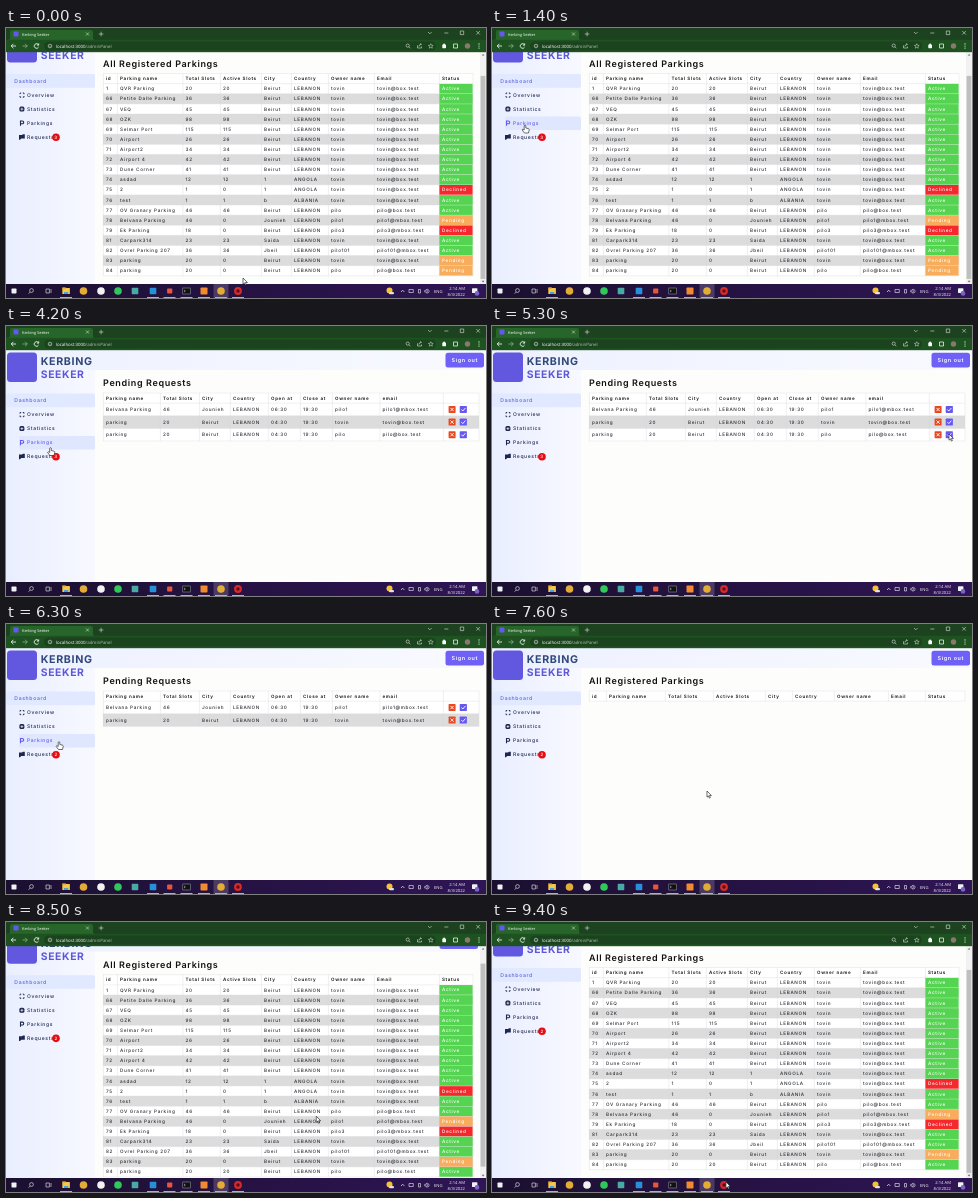
An HTML page that plays this animation: 480x270 px, repeating every 9700 ms.

```html
<!DOCTYPE html>
<html lang="en">
<head>
<meta charset="utf-8">
<title>Admin panel</title>
<style>
html, body { margin: 0; width: 100%; height: 100%; overflow: hidden; background: #fff; }
svg { display: block; width: 100vw; height: 100vh; font-family: Inter, "Open Sans", sans-serif; text-rendering: geometricPrecision; }
#page { letter-spacing: .04em; }
#browser, #taskbar { font-family: "Open Sans", sans-serif; }
</style>
</head>
<body>
<svg id="stage" viewBox="0 0 480 270">
  <defs>
    <linearGradient id="side">
      <stop offset="0" stop-color="#e9eeff"/><stop offset="1" stop-color="#f8f9ff"/>
    </linearGradient>
    <linearGradient id="top">
      <stop offset="0" stop-color="#edf1ff"/><stop offset="1" stop-color="#f9faff"/>
    </linearGradient>
    <linearGradient id="bar">
      <stop offset="0" stop-color="#1b1030"/><stop offset="1" stop-color="#2f1555"/>
    </linearGradient>
  </defs>
  <g id="page"></g>
  <g id="browser"></g>
  <g id="taskbar"></g>
  <g id="pointer"></g>
</svg>
<script>
const LOOP = 9700, STEP = 100, SCROLL = 21.5;
const NAVY = '#1d274f', VIOLET = '#6658ee', INK = '#2b2d33';
const layer = id => document.getElementById(id);

const rect = (x, y, w, h, fill, extra = '') =>
  `<rect x="${x}" y="${y}" width="${w}" height="${h}" fill="${fill}" ${extra}/>`;
const disc = (x, y, r, fill, extra = '') => `<circle cx="${x}" cy="${y}" r="${r}" fill="${fill}" ${extra}/>`;
const line = (d, stroke, width = 0.8) =>
  `<path d="${d}" fill="none" stroke="${stroke}" stroke-width="${width}"/>`;
const text = (x, y, str, size = 4.65, fill = INK, weight = 500, anchor = 'start') =>
  `<text x="${x}" y="${y}" font-size="${size}" fill="${fill}" font-weight="${weight}" text-anchor="${anchor}">${str}</text>`;

// id | name | total | active | city | country | owner | status
const parkings = `1|QVR Parking|20|20|Beirut|LEBANON|tovin|A
66|Petite Dalle Parking|36|36|Beirut|LEBANON|tovin|A
67|VEQ|45|45|Beirut|LEBANON|tovin|A
68|OZK|98|98|Beirut|LEBANON|tovin|A
69|Selmar Port|115|115|Beirut|LEBANON|tovin|A
70|Airport|26|26|Beirut|LEBANON|tovin|A
71|Airport2|34|34|Beirut|LEBANON|tovin|A
72|Airport 4|42|42|Beirut|LEBANON|tovin|A
73|Dune Corner|41|41|Beirut|LEBANON|tovin|A
74|asdad|12|12|1|ANGOLA|tovin|A
75|2|1|0|1|ANGOLA|tovin|D
76|test|1|1|b|ALBANIA|tovin|A
77|OV Granary Parking|46|46|Beirut|LEBANON|pilo|A
78|Belvana Parking|46|0|Jounieh|LEBANON|pilo1|P
79|Ek Parking|18|0|Beirut|LEBANON|pilo3|D
81|Carpark314|23|23|Saida|LEBANON|tovin|A
82|Ovrel Parking 207|36|36|Jbeil|LEBANON|pilo101|A
83|parking|20|0|Beirut|LEBANON|tovin|P
84|parking|20|0|Beirut|LEBANON|pilo|P`.split('\n').map(row => row.split('|'));

const requests = [
  ['Belvana Parking', 46, 'Jounieh', 'LEBANON', '06:30', '19:30', 'pilo1'],
  ['parking', 20, 'Beirut', 'LEBANON', '04:30', '19:30', 'tovin'],
  ['parking', 20, 'Beirut', 'LEBANON', '04:30', '19:30', 'pilo'],
];
const mail = owner => owner + (/\d/.test(owner) ? '@mbox.test' : '@box.test');
const statuses = { A: ['Active', '#55d451'], D: ['Declined', '#f5282e'], P: ['Pending', '#f8ad5d'] };

const parkingHeads = ['id', 'Parking name', 'Total Slots', 'Active Slots', 'City', 'Country', 'Owner name', 'Email', 'Status'];
const requestHeads = ['Parking name', 'Total Slots', 'City', 'Country', 'Open at', 'Close at', 'Owner name', 'email'];
const columns = {
  parkings: [100, 114, 179.5, 217, 258, 288, 325, 371, 436],
  parkingsEmpty: [100, 117, 176, 224, 276, 303, 345, 399, 436],
  requests: [100, 157, 196, 227, 265, 297, 329, 376.5, 440],
  requestsEmpty: [100, 168, 219, 245, 287, 329.5, 371, 434, 465.5],
};
const menu = ['Overview', 'Statistics', 'Parkings', 'Requests'];
const menuTop = i => 82 + i * 14;

// Table frame, stripes, header and cells
function table(cols, heads, rows, right, rowHeight) {
  const top = 67, first = 77.2, bottom = first + rows.length * rowHeight;
  const rowTop = i => first + i * rowHeight;
  let out = rect(97, top, right - 97, bottom - top, '#fff');
  rows.forEach((_, i) => { if (i % 2) out += rect(97, rowTop(i), right - 97, rowHeight, '#dcdcdc'); });
  const grid = cols.map(x => `M${x - 2.6} ${top}V${bottom}`).join('') + `M${right} ${top}V${bottom}`
    + `M97 ${top}H${right}M97 ${first}H${right}` + rows.map((_, i) => `M97 ${rowTop(i + 1)}H${right}`).join('');
  out += line(grid, '#d8d9dd', 0.4);
  heads.forEach((head, i) => out += text(cols[i], 73.8, head, 4.55, '#111', 600));
  rows.forEach((row, r) => row.forEach((cell, c) =>
    out += text(cols[c], rowTop(r) + rowHeight / 2 + 1.6, cell)));
  return out;
}

const heading = title => text(97, 60, title, 9, '#111', 600);

function parkingsView(state) {
  const title = heading('All Registered Parkings');
  if (!state.loaded) return title + table(columns.parkingsEmpty, parkingHeads, [], 473, 10.1);
  const rows = parkings.map(row => [...row.slice(0, 7), mail(row[6])]);
  if (state.accepted) rows[18][3] = '20';
  const badges = parkings.map((row, i) => {
    const [label, fill] = statuses[state.accepted && i === 18 ? 'A' : row[7]];
    const y = 77.2 + i * 10.11;
    return rect(433.4, y + 0.2, 33.2, 9.7, fill) + text(436, y + 6.6, label, 4.65, '#fff');
  });
  return title + table(columns.parkings, parkingHeads, rows, 467, 10.11) + badges.join('');
}

function requestsView(state) {
  const title = heading('Pending Requests');
  if (!state.loaded) return title + table(columns.requestsEmpty, requestHeads, [], 473, 12.6);
  const rows = requests.slice(0, state.accepted ? 2 : 3).map(row => [...row, mail(row[6])]);
  const buttons = rows.map((_, i) => {
    const y = 83.5 + i * 12.6;
    return rect(442.6, y - 3.5, 7, 7, '#e9481f', 'rx=".7"')
      + line(`M444.5 ${y - 1.6}l3.2 3.2m0 -3.2l-3.2 3.2`, '#fff', 0.9)
      + rect(453.7, y - 3.5, 7.2, 7, VIOLET, 'rx=".7"')
      + line(`M455.4 ${y}l1.4 1.5l2.6 -3`, '#fff', 0.9);
  });
  return title + table(columns.requests, requestHeads, rows, 473, 12.6) + buttons.join('');
}

function menuIcon(i, y, fill) {
  if (i === 0) return line(`M14 ${y - 0.9}v-1.2h1.2m1.6 0h1.2v1.2m0 1.8v1.2h-1.2m-1.6 0h-1.2v-1.2`, fill, 0.9);
  if (i === 1) return rect(13.4, y - 2.5, 5, 5, fill, 'rx="1.6"') + line(`M15.9 ${y - 1.4}v2.8m-1.4 -1.4h2.8`, '#fff', 0.7);
  if (i === 2) return line(`M14.5 ${y + 2.6}v-4.7h1.8a1.4 1.4 0 0 1 0 2.8h-1.8`, fill, 1.1);
  return `<path d="M13 ${y - 2}h3l1 -.8h1.8v4.2h-3.5l-1.3 1.3h-1z" fill="${fill}"/>`;
}

function sidebar(state) {
  let out = rect(1, 26.5, 30, 29.5, '#6258e0', 'rx="3.5"')
    + text(34.7, 39.3, 'KERBING', 10.7, '#30477a', 700)
    + text(34.7, 52.3, 'SEEKER', 10.4, '#5d58d8', 700)
    + rect(0, 67.5, 89, 13.7, '#e0e9ff', 'rx="1.5"')
    + text(8.3, 76.3, 'Dashboard', 5.15, '#5f62d8');
  menu.forEach((label, i) => {
    const y = menuTop(i) + 6.6, hot = state.hover === i, fill = hot ? VIOLET : NAVY;
    if (hot) out += rect(13, menuTop(i), 76, 13.5, '#dfe7ff', 'rx="1.5"');
    out += menuIcon(i, y, fill) + text(21, y + 1.8, label, 5, fill);
  });
  return out + disc(50, 130.7, 3.8, '#e60d12')
    + text(50.1, 132.3, state.accepted ? 2 : 3, 4.5, '#fff', 500, 'middle');
}

function scrollbar(scroll) {
  const y = 29 + scroll * 0.88;
  return rect(474, 24, 6, 232, '#f1f1f1') + rect(474.6, y, 4.8, 203, '#bfbfbf')
    + '<path d="M475.7 27.5l1.4 -1.6l1.4 1.6zM475.7 252.8l1.4 1.6l1.4 -1.6z" fill="#666"/>';
}

function drawPage(state) {
  const tall = state.view === 'parkings' && state.loaded;
  const right = tall ? 472 : 478;
  layer('page').innerHTML = rect(0, 0, 480, 270, '#fdfdfc') + rect(0, 24, 89, 232, 'url(#side)')
    + `<g transform="translate(0 ${-state.scroll})">`
    + rect(0, 24, 480, 20, 'url(#top)')
    + sidebar(state)
    + rect(right - 38.5, 26.8, 38.5, 14.6, '#6f60f7', 'rx="2.5"')
    + text(right - 19.2, 36, 'Sign out', 5.4, '#fff', 600, 'middle')
    + (state.view === 'parkings' ? parkingsView(state) : requestsView(state))
    + '</g>' + (tall ? scrollbar(state.scroll) : '');
}

function drawBrowser() {
  const pale = '#d8e4d8';
  layer('browser').innerHTML = rect(0, 0, 480, 12, '#1d421f')
    + '<path d="M2 12q2 0 2 -2v-6q0 -2 2 -2h79q2 0 2 2v6q0 2 2 2z" fill="#28652a"/>'
    + rect(0, 11.8, 480, 12.4, '#1e5321') + rect(38, 13.5, 392, 9, '#1b441e', 'rx="4.5"')
    + rect(7.5, 3.5, 5, 5, VIOLET, 'rx=".8"')
    + text(16, 7.5, 'Kerbing Seeker', 3.9, '#fff', 400)
    + line('M80 4.5l3 3m0 -3l-3 3M92.8 6h4.6m-2.3 -2.3v4.6', pale, 0.6)
    + line('M422 4l1.8 1.8l1.8 -1.8M438.3 5h4M454.3 3h3.4v3.6h-3.4zM470.3 3l3.6 3.6m0 -3.6l-3.6 3.6', pale, 0.6)
    + line('M10 18H5.2m2.2 -2.2L5.2 18l2.2 2.2', '#fff', 0.8)
    + line('M16.5 18h4.8m-2.2 -2.2l2.2 2.2l-2.2 2.2', '#8fab90', 0.8)
    + line('M32.5 16.8a2.3 2.3 0 1 0 .1 2.2m.1 -3.6v1.7h-1.8', '#fff', 0.8)
    + disc(44, 18, 1.8, 'none', `stroke="${pale}" stroke-width=".6"`) + line('M44 17.6v1.4', pale, 0.5)
    + text(50, 19.6, 'localhost:3000<tspan fill="#b3c6b3">/adminPanel</tspan>', 4.4, '#fff', 400)
    + disc(401.7, 17.6, 1.6, 'none', `stroke="${pale}" stroke-width=".6"`)
    + line('M403 18.9l1.4 1.4M411.5 17.3v2.7h4v-1.5m-2.6 0q.2 -2.2 2.4 -2.2m-1 -1l1 1l-1 1', pale, 0.6)
    + line('M424.8 15.7l.7 1.6l1.7 .1l-1.3 1.1l.4 1.7l-1.5 -.9l-1.5 .9l.4 -1.7l-1.3 -1.1l1.7 -.1z', pale, 0.5)
    + rect(436.3, 16.5, 3.7, 3.7, '#fff', 'rx=".6"') + disc(438.1, 16.3, 0.9, '#fff')
    + line('M447.5 16h4v4h-4z', '#fff', 0.7)
    + disc(461.5, 18, 2.7, '#8b7770')
    + [15.9, 18, 20.1].map(y => disc(473, y, 0.55, '#fff')).join('');
}

function drawTaskbar() {
  const y = 263, white = '#eef2f5';
  const square = (x, fill, size = 6.6) => rect(x - size / 2, y - size / 2, size, size, fill, 'rx=".8"');
  const underline = [60, 147, 163.5, 180.5, 198, 215, 232];
  const app = (x, fill) => disc(x, y, 3.8, fill);
  layer('taskbar').innerHTML = rect(0, 256, 480, 14, 'url(#bar)') + rect(207.5, 256, 15, 14, '#4b3a63')
    + square(8, white, 5)
    + disc(25.5, 262.5, 1.9, 'none', `stroke="${white}" stroke-width=".6"`) + line('M24.2 264l-1.6 1.7', white, 0.6)
    + line('M40 261h3.4v4h-3.4zM45 261v4', white, 0.6)
    + rect(56.3, 260, 7.6, 6, '#f5c64a', 'rx=".6"') + rect(56.3, 259.3, 3.5, 1.5, '#dca22d') + rect(58, 264, 4.2, 2, '#4b9fdd')
    + app(77.5, '#e3ac35') + app(95, '#f2f2f2') + app(112, '#31c85a') + square(129, '#4aa9a5')
    + square(147, '#2890d8') + square(163.7, '#e8563a', 5.2)
    + rect(176.8, 260, 7.6, 6, '#111', 'stroke="#9aa3aa" stroke-width=".5"') + line('M178 262l1.3 1l-1.3 1', white, 0.5)
    + square(198, '#f28a32', 7) + app(215, '#e3ac35')
    + disc(232, y, 3.9, '#d82a2a') + disc(232, y, 1.7, '#5d1014')
    + underline.map(x => rect(x - 6, 269, 12, 1, '#b9a3e0')).join('')
    + disc(383.5, 262.5, 3, '#f5c13a') + rect(383, 264, 5, 2.3, '#dce2e8', 'rx="1.1"')
    + line('M395 264l1.7 -1.8l1.7 1.8', white, 0.7)
    + line('M403 261.5h4.3v3h-4.3zM412.5 265v-3.5h2v3.5zM422.3 261.5a2.4 2.4 0 0 1 0 3.4M418.8 262.3h1l1.4 -1.3v4.4l-1.4 -1.3h-1z', white, 0.6)
    + text(428, 264.6, 'ENG', 4.2, white, 400)
    + text(459, 261.7, '2:14 AM', 4.2, white, 400, 'end')
    + text(459, 268, '8/3/2022', 4.2, white, 400, 'end')
    + rect(466, 260.3, 5.4, 4.6, white, 'rx=".4"') + disc(471, 265.4, 2.3, '#7b62c8');
}

// Pointer tip: time, x, y
const path = [
  [0, 237, 250], [1000, 41, 91], [1400, 33, 97], [2000, 35, 108.5], [2700, 35, 108.5], [3300, 33, 130],
  [3500, 33, 130], [3700, 34, 131], [3800, 34, 131], [4200, 44.5, 121.5], [4800, 440, 111], [5100, 461, 107],
  [5300, 457, 108], [5400, 457, 108], [6300, 53, 117.5], [6400, 53, 117.5], [6500, 51, 117], [6600, 51, 117],
  [7600, 215, 167], [8300, 311, 192], [8600, 310, 195], [9400, 234, 260], [LOOP, 234, 260],
];

function pointerAt(time) {
  const next = Math.max(1, path.findIndex(key => key[0] >= time));
  const [t0, x0, y0] = path[next - 1], [t1, x1, y1] = path[next];
  const u = (time - t0) / (t1 - t0), ease = u * u * (3 - 2 * u);
  return [x0 + (x1 - x0) * ease, y0 + (y1 - y0) * ease];
}

function drawPointer(x, y, hand) {
  const shape = hand
    ? 'M-.8 .7Q0 -.5 .8 .7V3L3.6 3.7Q4.4 4 4.2 5L3.5 8H-.5L-3 4.9Q-2.6 3.6 -.8 5Z'
    : 'M0 0V6.2L1.4 4.9L2.4 7.1L3.4 6.6L2.4 4.5H4.4Z';
  layer('pointer').innerHTML =
    `<path transform="translate(${x} ${y})" d="${shape}" fill="#fff" stroke="#111" stroke-width=".6"/>`;
}

function stateAt(time) {
  const [x, y] = pointerAt(time);
  const onRequests = time >= 2400 && time < 6900;
  const late = Math.min(1, Math.max(0, (time - 8300) / 300));
  const scroll = time < 2400 ? SCROLL : SCROLL * late;
  const hover = x >= 13 && x < 89
    ? menu.findIndex((_, i) => y + scroll >= menuTop(i) && y + scroll < menuTop(i + 1)) : -1;
  return {
    x, y, scroll, hover,
    view: onRequests ? 'requests' : 'parkings',
    loaded: !(time >= 2400 && time < 2800) && !(time >= 6900 && time < 7700),
    accepted: time >= 5500,
  };
}

const start = performance.now();
let lastStep = -1;
function frame(now) {
  const step = Math.floor((Math.max(0, now - start) % LOOP) / STEP);
  if (step !== lastStep) {
    lastStep = step;
    const state = stateAt(step * STEP);
    drawPage(state);
    drawPointer(state.x, state.y, state.hover >= 0);
  }
  requestAnimationFrame(frame);
}

drawBrowser();
drawTaskbar();
frame(start);
</script>
</body>
</html>
```
